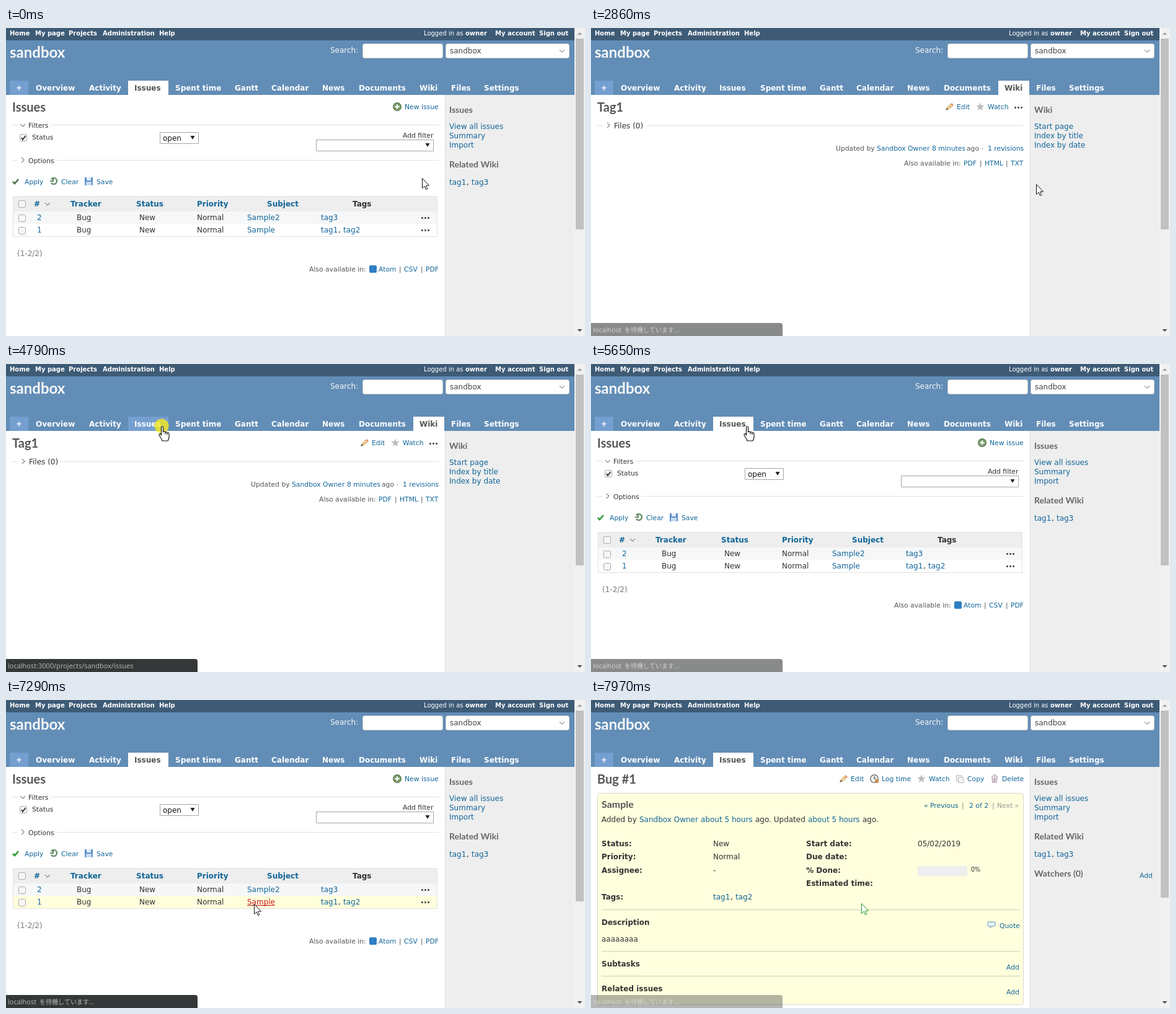
Recreate the animation shown at these times as an HTML page with a canvas. Size 934 by 497 pixels, loop 8 s.

```html
<!DOCTYPE html>
<html lang="en">
<head>
<meta charset="utf-8">
<title>Issue tracker walkthrough</title>
<style>
html, body { margin: 0; width: 100%; height: 100%; overflow: hidden; background: #fff; }
canvas { display: block; }
</style>
</head>
<body>
<canvas id="stage" width="934" height="497"></canvas>
<script>
const ctx = document.getElementById('stage').getContext('2d');
const LOOP = 8000;
const SANS = '"DejaVu Sans", sans-serif', HEAD = 'Lato, sans-serif', UI = '"Open Sans", sans-serif';
const LINK = '#116699', SMALL = 10.8;

// Cursor moves: first step, last step, number of steps, destination
const MOVES = [
  [440, 540, 2, 701, 250], [770, 900, 3, 711, 252], [1070, 1220, 3, 718, 252],
  [3560, 3860, 5, 59, 150], [3940, 4180, 4, 328, 110], [4250, 4330, 2, 322, 98],
  [4400, 4720, 5, 251, 100], [5790, 6430, 9, 392, 305], [6490, 6820, 5, 400, 329],
  [7900, 7970, 2, 436, 328]
];
const CLICKS = [[2010, 2070], [4790, 4950], [6960, 7130]];
const BARS = [
  { from: 1360, wait: 2310, url: 'projects/sandbox/wiki/Tag1', light: true, fade: [[2790, .8], [2860, .58], [2940, .3], [3000, 0]] },
  { from: 4720, wait: 5170, url: 'projects/sandbox/issues', fade: [[5650, .58], [5720, .3], [5790, 0]] },
  { from: 6960, wait: 7290, url: 'issues/1', fade: [[7900, .7], [7970, .37]] }
];
const TABS = [['Overview', 48], ['Activity', 134], ['Issues', 207], ['Spent time', 273], ['Gantt', 369],
  ['Calendar', 428], ['News', 510], ['Documents', 569], ['Wiki', 667], ['Files', 718], ['Settings', 771]];

let cursor, overLink;

function cursorAt(t) {
  let x = 671, y = 242;
  for (const [start, end, steps, toX, toY] of MOVES) {
    if (t < start) break;
    const k = Math.min(steps, 1 + Math.floor((t - start) / (end - start) * (steps - 1) + 1e-6)) / steps;
    x += (toX - x) * k;
    y += (toY - y) * k;
  }
  return { x: Math.round(x), y: Math.round(y) };
}

const inside = (x, y, w, h) => cursor.x >= x && cursor.x < x + w && cursor.y >= y && cursor.y < y + h;

function rect(x, y, w, h, fill, stroke, radius = 0) {
  ctx.beginPath();
  const inset = stroke ? .5 : 0;
  ctx.roundRect(x + inset, y + inset, w - 2 * inset, h - 2 * inset, radius);
  ctx.fillStyle = fill;
  ctx.fill();
  if (stroke) { ctx.strokeStyle = stroke; ctx.lineWidth = 1; ctx.stroke(); }
}

function shape(d, x, y, fill, stroke, width = 1) {
  const p = new Path2D(d);
  ctx.save();
  ctx.translate(x, y);
  if (fill) { ctx.fillStyle = fill; ctx.fill(p); }
  if (stroke) { ctx.strokeStyle = stroke; ctx.lineWidth = width; ctx.stroke(p); }
  ctx.restore();
}

function disc(x, y, r, fill) {
  ctx.beginPath();
  ctx.arc(x, y, r, 0, 7);
  ctx.fillStyle = fill;
  ctx.fill();
}

function text(s, x, y, size = 12, color = '#333', weight = 400, family = SANS) {
  ctx.font = `${weight} ${size}px ${family}`;
  ctx.fillStyle = color;
  ctx.fillText(s, x, y);
}
const bold = (s, x, y, color) => text(s, x, y, 12, color, 700);
const heading = (s, x, y, size, color = '#555') => text(s, x, y, size, color, 700, HEAD);
const small = (s, x, y, color = '#555') => text(s, x, y, SMALL, color);

function link(s, x, y, size = 12, weight = 400) {
  ctx.font = `${weight} ${size}px ${SANS}`;
  const w = ctx.measureText(s).width;
  const hover = inside(x, y - 11, w, 14);
  overLink ||= hover;
  const color = hover ? '#c61a1a' : LINK;
  text(s, x, y, size, color, weight);
  if (hover) rect(x, y + 1, Math.round(w), 1, color);
}
const smallLink = (s, x, y) => link(s, x, y, SMALL);

// Icons
const chevronDown = (x, y, color = '#999') => shape('M-4-2L0 2L4-2', x, y, null, color, 1.5);
const chevronRight = (x, y) => shape('M-2-4L2 0L-2 4', x, y, null, '#999', 1.5);
const triangle = (x, y) => shape('M-3.5-3H3.5L0 3Z', x, y, '#222');
const dots = (x, y) => [0, 5, 10].forEach(dx => rect(x + dx, y, 3, 3, '#555', null, 1));
const star = (x, y) => shape('M0-6.5L1.8-2H6.5L2.8 1.2L4 6L0 3.2L-4 6L-2.8 1.2L-6.5-2H-1.8Z', x, y, '#bbb');
function pencil(x, y) {
  shape('M1 11L2.5 7L9 1L12 4L5 10Z', x, y, '#f2d08c', '#b98d52', .8);
  shape('M0 12L2 8L4 10Z', x, y, '#555');
  shape('M8 2L10 0L13 3L11 5Z', x, y, '#e59b7d');
}
function checkbox(x, y, checked) {
  rect(x, y, 12, 12, '#f6f6f6', '#aaa', 2);
  if (checked) shape('M3 6L5 9L9.5 3', x, y, null, '#333', 2);
}
function select(x, y, w, label) {
  rect(x, y, w, 19, '#fff', '#a6a6a6');
  triangle(x + w - 10, y + 9);
  if (label) text(label, x + 5, y + 14, 12, '#111');
}

function rule(x1, x2, y, color = '#e2e2e2') { rect(x1, y, x2 - x1, 1, color); }

function frame(active, thumbEnd) {
  rect(0, 0, 934, 497, '#fff');
  rect(0, 0, 917, 20, '#3e5b76');
  rect(0, 20, 917, 88, '#628db6');
  for (const [s, x] of [['Home', 6], ['My page', 47], ['Projects', 101], ['Administration', 156], ['Help', 247],
    ['owner', 741], ['My account', 789], ['Sign out', 860]]) text(s, x, 12, 10, '#fff', 700);
  text('Logged in as', 674, 12, 10, '#fff');
  heading('sandbox', 6, 48, 24, '#f8f8f8');
  text('Search:', 523, 40, 12, '#f8f8f8');
  rect(575, 25, 130, 24, '#fff', '#ccc', 3);
  rect(709, 25, 200, 24, '#fff', '#ccc', 3);
  text('sandbox', 716, 41, 12, '#444');
  chevronDown(897, 37, '#aaa');

  rect(6, 85, 30, 23, '#759fcf');
  bold('+', 16, 101, '#fff');
  TABS.forEach(([s, x], i) => {
    const end = i + 1 < TABS.length ? TABS[i + 1][1] - 11 : 838;
    const w = end - x + 10;
    const hover = inside(x - 10, 85, w, 23), on = s === active;
    overLink ||= hover;
    if (on || hover) rect(x - 10, 85, w, 23, on ? '#fff' : '#759fcf');
    bold(s, x, 101, on ? '#555' : '#fff');
  });

  rect(708, 108, 209, 389, '#eee');
  rect(708, 108, 1, 389, '#ddd');
  rect(917, 0, 17, 497, '#f1f1f1');
  rect(919, 17, 13, thumbEnd - 17, '#c1c1c1');
  shape('M-4 2H4L0-2Z', 925.5, 9, '#a3a3a3');
  shape('M-4-2H4L0 2Z', 925.5, 488, '#505050');
}

function sidebar(title, links) {
  heading(title, 715, 137, 14, '#666');
  links.forEach((s, i) => link(s, 715, 163 + 15 * i));
}

function issueSidebar() {
  sidebar('Issues', ['View all issues', 'Summary', 'Import']);
  heading('Related Wiki', 715, 225, 14, '#666');
  tagPair('tag1', 'tag3', 715, 253);
}

function tagPair(a, b, x, y) {
  link(a, x, y);
  text(',', x + 28, y, 12, '#333');
  link(b, x + 36, y);
}

function listPage(t) {
  frame('Issues', 325);
  heading('Issues', 10, 135, 20);
  disc(631, 127, 7, '#5f7f55');
  disc(631, 127, 5.5, '#7fa073');
  shape('M-3.5 0H3.5M0-3.5V3.5', 631, 127, null, '#fff', 2);
  smallLink('New issue', 643, 131);

  rule(10, 19, 156); rule(72, 698, 156);
  chevronDown(27, 157);
  small('Filters', 36, 161, '#333');
  checkbox(22, 171, true);
  small('Status', 42, 180, '#333');
  select(248, 168, 63, 'open');
  small('Add filter', 640, 177, '#333');
  select(500, 180, 190);
  rule(10, 19, 213); rule(81, 698, 213);
  chevronRight(27, 213);
  small('Options', 36, 218, '#333');

  shape('M11 248L14 251L20 244', 0, 0, null, t < 3000 ? '#4f6f4f' : '#2f9a35', 2.6);
  smallLink('Apply', 30, 252);
  shape('M-4 3A5 5 0 1 0-4-3M-6 0H-1V-5', 77, 247, null, '#5d8a5d', 2.2);
  smallLink('Clear', 89, 252);
  rect(127, 241, 13, 13, '#5c8fc9', null, 1);
  rect(130, 241, 7, 5, '#e4eefa');
  rect(129, 248, 9, 6, '#c9dbf0');
  smallLink('Save', 146, 252);

  rect(11, 271, 685, 66, '#fff', '#e2e2e2');
  rect(12, 272, 683, 24, '#eee');
  checkbox(20, 278);
  for (const [s, x] of [['#', 45], ['Tracker', 104], ['Status', 210], ['Priority', 308], ['Subject', 421]])
    link(s, x, 288, 12, 700);
  chevronDown(67, 284);
  bold('Tags', 559, 288);
  [['2', 'Sample2', '#f6f7f8'], ['1', 'Sample', '#fff']].forEach(([id, subject, color], i) => {
    const top = 296 + 20 * i, y = top + 14;
    rect(12, top, 683, 20, inside(12, top, 683, 20) ? '#ffffdd' : color);
    checkbox(20, top + 5);
    link(id, 50, y);
    text('Bug', 114, y);
    text('New', 215, y);
    text('Normal', 308, y);
    link(subject, 389, y);
    if (i) tagPair('tag1', 'tag2', 508, y); else link('tag3', 508, y);
    dots(670, top + 9);
  });

  text('(1-2/2)', 18, 368, 12, '#777');
  small('Also available in:', 489, 393);
  rect(586, 383, 12, 12, '#2f7fc4', null, 2);
  smallLink('Atom', 601, 393);
  small('|', 634, 393);
  smallLink('CSV', 642, 393);
  small('|', 669, 393);
  smallLink('PDF', 677, 393);
  issueSidebar();
}

function wikiPage() {
  frame('Wiki', 325);
  heading('Tag1', 10, 135, 20);
  pencil(572, 121);
  smallLink('Edit', 590, 131);
  star(628, 127);
  smallLink('Watch', 640, 131);
  dots(683, 127);
  rule(10, 20, 157); rule(90, 698, 157);
  chevronRight(28, 157);
  text('Files (0)', 37, 162);
  small('Updated by', 395, 198);
  smallLink('Sandbox Owner', 461, 198);
  smallLink('8 minutes', 550, 198);
  small('ago ·', 606, 198);
  smallLink('1 revisions', 640, 198);
  small('Also available in:', 505, 222);
  smallLink('PDF', 601, 222);
  small('|', 627, 222);
  smallLink('HTML', 635, 222);
  small('|', 669, 222);
  smallLink('TXT', 677, 222);
  sidebar('Wiki', ['Start page', 'Index by title', 'Index by date']);
}

function bugPage() {
  frame('Issues', 319);
  heading('Bug #1', 10, 135, 20);
  pencil(401, 121);
  disc(457, 127, 7, '#777');
  disc(457, 127, 5.5, '#f2f2f2');
  shape('M0-4V0H3', 457, 127, null, '#444', 1.2);
  disc(461, 131, 3, '#c98a4a');
  star(533, 127);
  rect(589, 121, 9, 10, '#f4f4f4', '#bbb');
  rect(592, 124, 9, 10, '#f4f4f4', '#bbb');
  shape('M-5-4H5M-2-6H2M-4-3L-3 6H3L4-3M-1-2V5M1-2V5', 651, 127, null, '#a58a9a', 1.2);
  for (const [s, x] of [['Edit', 419], ['Log time', 469], ['Watch', 545], ['Copy', 607], ['Delete', 663]])
    smallLink(s, x, 131);

  rect(10, 150, 688, 342, '#ffffdd', '#d7d7d7', 3);
  heading('Sample', 17, 174, 16);
  smallLink('« Previous', 537, 174);
  small('|', 598, 174, '#888');
  smallLink('2 of 2', 610, 174);
  small('|', 647, 174, '#888');
  small('Next »', 655, 174, '#999');
  text('Added by', 17, 197);
  link('Sandbox Owner', 78, 197);
  link('about 5 hours', 177, 197);
  text('ago. Updated', 265, 197);
  link('about 5 hours', 350, 197);
  text('ago.', 438, 197);

  for (const [s, x, y] of [['Status:', 17, 236], ['Priority:', 17, 257], ['Assignee:', 17, 279], ['Tags:', 17, 322],
    ['Start date:', 347, 236], ['Due date:', 347, 257], ['% Done:', 347, 279], ['Estimated time:', 347, 300],
    ['Description', 17, 363], ['Subtasks', 17, 430], ['Related issues', 17, 470]]) bold(s, x, y);
  text('New', 197, 236);
  text('Normal', 197, 257);
  text('-', 197, 279);
  tagPair('tag1', 'tag2', 197, 322);
  text('05/02/2019', 527, 236);
  rect(527, 268, 80, 16, '#eee');
  text('0%', 613, 277, 9.6);
  [338, 405, 445].forEach(y => rule(17, 691, y, '#cfcfb8'));
  shape('M-5-4H5Q6-4 6-3V2Q6 3 5 3H0L-2 6V3H-5Q-6 3-6 2V-3Q-6-4-5-4Z', 646, 362, '#e3f0f8', '#6d9cc0');
  smallLink('Quote', 659, 368);
  text('aaaaaaaa', 17, 390);
  smallLink('Add', 670, 435);
  smallLink('Add', 670, 475);
  issueSidebar();
  heading('Watchers (0)', 715, 285, 14, '#666');
  smallLink('Add', 885, 287);
}

function statusBar(t) {
  const bar = BARS.findLast(b => t >= b.from);
  if (!bar) return;
  const alpha = bar.fade.findLast(([at]) => t >= at)?.[1] ?? 1;
  if (!alpha) return;
  const light = bar.light && alpha === 1;
  ctx.globalAlpha = alpha;
  if (light) rect(-2, 475, 312, 26, '#fff', '#b5b5b5', 4);
  else rect(0, 476, 309, 24, '#353838', null, [0, 4, 0, 0]);
  ctx.globalAlpha = 1;
  const color = light ? '#333' : alpha < 1 ? '#d3d3d0' : '#bbb';
  if (t < bar.wait) return text('localhost:3000/' + bar.url, 3, 491, 11, color, 400, UI);
  text('localhost', 3, 491, 11, color, 400, UI);
  text('を待機しています...', 54, 491, 10, color, 400, '"Noto Sans CJK JP", "Noto Sans CJK", sans-serif');
}

function drawCursor(t) {
  if (CLICKS.some(([a, b]) => t >= a && t < b)) disc(cursor.x, cursor.y, 11.5, 'rgba(255,238,20,.75)');
  const { x, y } = cursor;
  if (overLink && t < 7130)
    shape('M-1.5 15V2Q-1.5 0 0 0T1.5 2V9Q3.5 7.5 5 9.5Q7 8.5 8 10.5Q11 9.5 11 12.5V17Q11 20 9 23.5H0Q-1 20-4 16Q-6 12.5-4 12T-1.5 15ZM5 9.5V13M8 10.5V13.5',
      x + 1, y + .5, '#fff', '#111', 1.2);
  else
    shape('M0 0V16L3.6 12.6L6 18L8.3 17L6 11.6H11Z', x + .5, y + .5, '#fff', t >= 7970 ? '#1f9a2c' : '#111');
}

function draw(t) {
  cursor = cursorAt(t);
  overLink = false;
  if (t >= 7510) bugPage();
  else if (t >= 2390 && t < 5250) wikiPage();
  else listPage(t);
  statusBar(t);
  drawCursor(t);
}

const begin = performance.now();
function tick() {
  draw((performance.now() - begin) % LOOP);
  requestAnimationFrame(tick);
}
tick();
</script>
</body>
</html>
```
